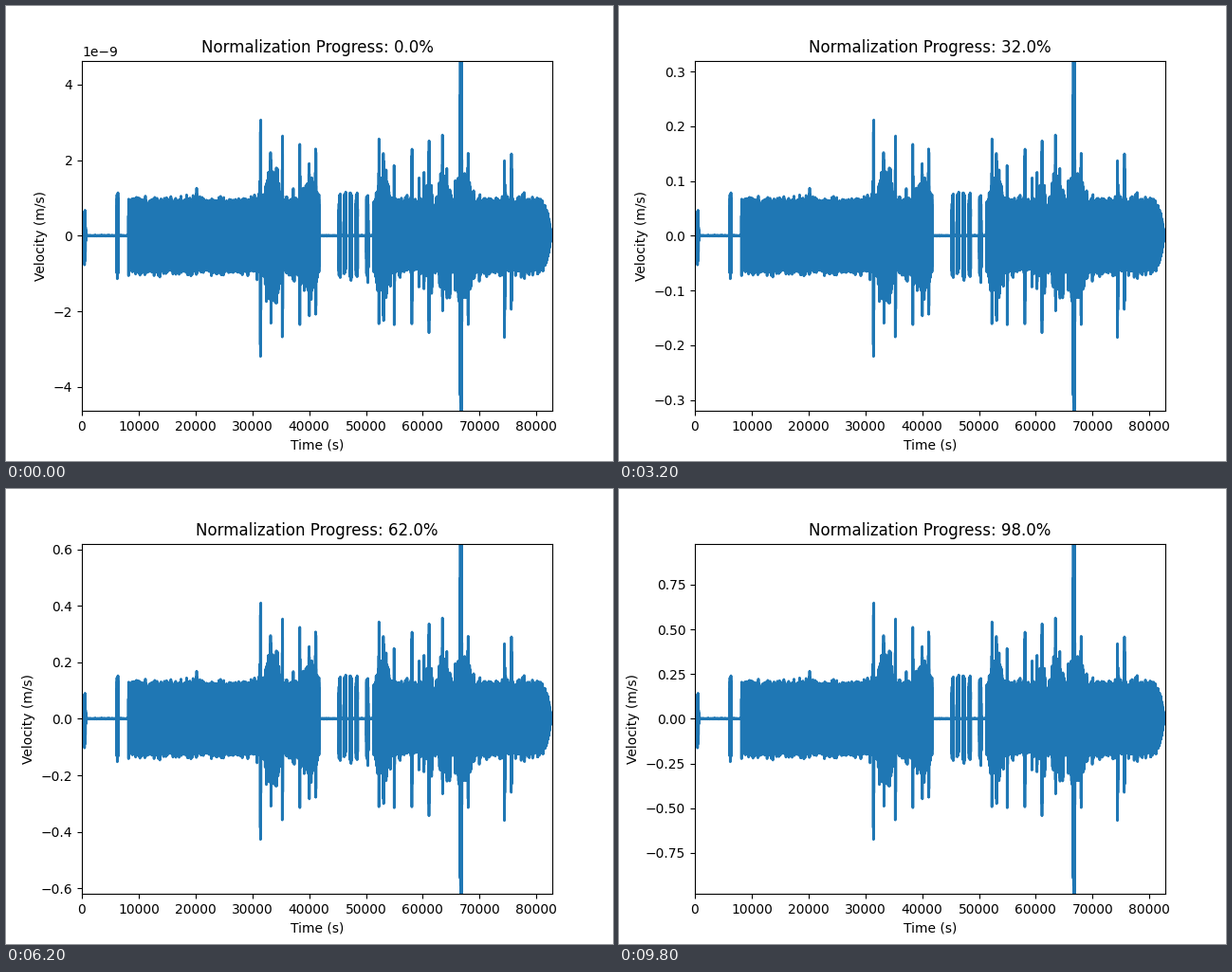
A matplotlib script for the animation above (10 s loop, 640 px wide and 480 px high).

```python
import numpy as np
import matplotlib.pyplot as plt
from matplotlib.animation import FuncAnimation

FRAMES = 50
END = 82.8         # record length in thousands of seconds
PEAK = 4.632       # largest velocity, in 1e-9 m/s
STEP = 0.004

# Key times in thousands of seconds
RUNS = [(8.2, 41.8), (51.3, 82.8)]                # long stretches of noise
BLIPS = [6.25, 45.4, 46.3, 47.3, 48.4, 50.25]     # short bursts
SWELLS = [33.6, 40.0, 53.2, 67.2]                 # middles of louder spells
SHOCKS = [33.25, 35.3, 38.35, 40.0, 41.15, 52.3, 53.1,
          55.0, 58.1, 61.1, 68.0, 74.4, 75.6]     # sharp peaks of like size
STRONG = {31.45: 3.6, 63.5: 2.85}                 # taller peaks: time, height
MAIN = 66.72                                      # the tallest peak


def bump(t, mid, width, power=2):
    return np.exp(-np.abs((t - mid) / width) ** power)


def envelope(t, rng):
    """Loudness over time, in 1e-9 m/s."""
    level = 0.85 * bump(t, 0.5, 0.15)
    for mid in BLIPS:
        level[abs(t - mid) < 0.15] = 1.2

    # Slow spells, broken up by a random factor for every 0.2 ks
    swell = sum(bump(t, mid, 1.3, 4) for mid in SWELLS)
    blocks = rng.uniform(0.35, 0.9, int(END / 0.2) + 2)
    body = 1 + swell * blocks[(t / 0.2).astype(int)]
    body *= 1 - np.clip((t - 79.5) / 3.15, 0, 1) ** 4
    for a, b in RUNS:
        on = (t > a) & (t < b)
        level[on] = body[on]

    # Small random peaks, the larger ones in the two restless periods
    peaks = dict(STRONG)
    peaks.update((mid, rng.uniform(2.3, 2.65)) for mid in SHOCKS)
    for a, b, top, count in ((31, 38, 1.7, 12), (55, 68, 1.9, 18),
                             (8.3, 31, 1.22, 8), (68, 79, 1.25, 6)):
        for mid in rng.uniform(a, b, count):
            peaks[mid] = rng.uniform(1.1, top)
    for mid, height in peaks.items():
        level = np.maximum(level, height * bump(t, mid, 0.07, 4))
    return np.maximum(level, 1.5 * PEAK * bump(t, MAIN, 0.18))


def make_wave():
    """Return time in seconds and velocity as a share of the peak."""
    rng = np.random.default_rng(4)
    t = np.arange(0, END, STEP)
    noise = 0.94 * rng.uniform(-1, 1, t.size) + 0.07 * rng.normal(size=t.size)
    wave = noise * envelope(t, rng) + 0.003 * rng.normal(size=t.size)
    return t * 1000, np.clip(wave / PEAK, -1, 1)


time, wave = make_wave()

fig, ax = plt.subplots(figsize=(6.4, 4.8), dpi=100)
line, = ax.plot(time, wave, lw=2)
ax.set_xlim(0, END * 1000)
ax.set_xlabel("Time (s)")
ax.set_ylabel("Velocity (m/s)")


def update(i):
    progress = i / FRAMES
    scale = progress or PEAK * 1e-9
    line.set_ydata(wave * scale)
    ax.set_ylim(-scale, scale)
    ax.set_title(f"Normalization Progress: {progress * 100:.1f}%")
    return line,


anim = FuncAnimation(fig, update, frames=FRAMES, interval=200,
                     init_func=lambda: update(0), repeat=True, repeat_delay=0)
plt.show()
```
